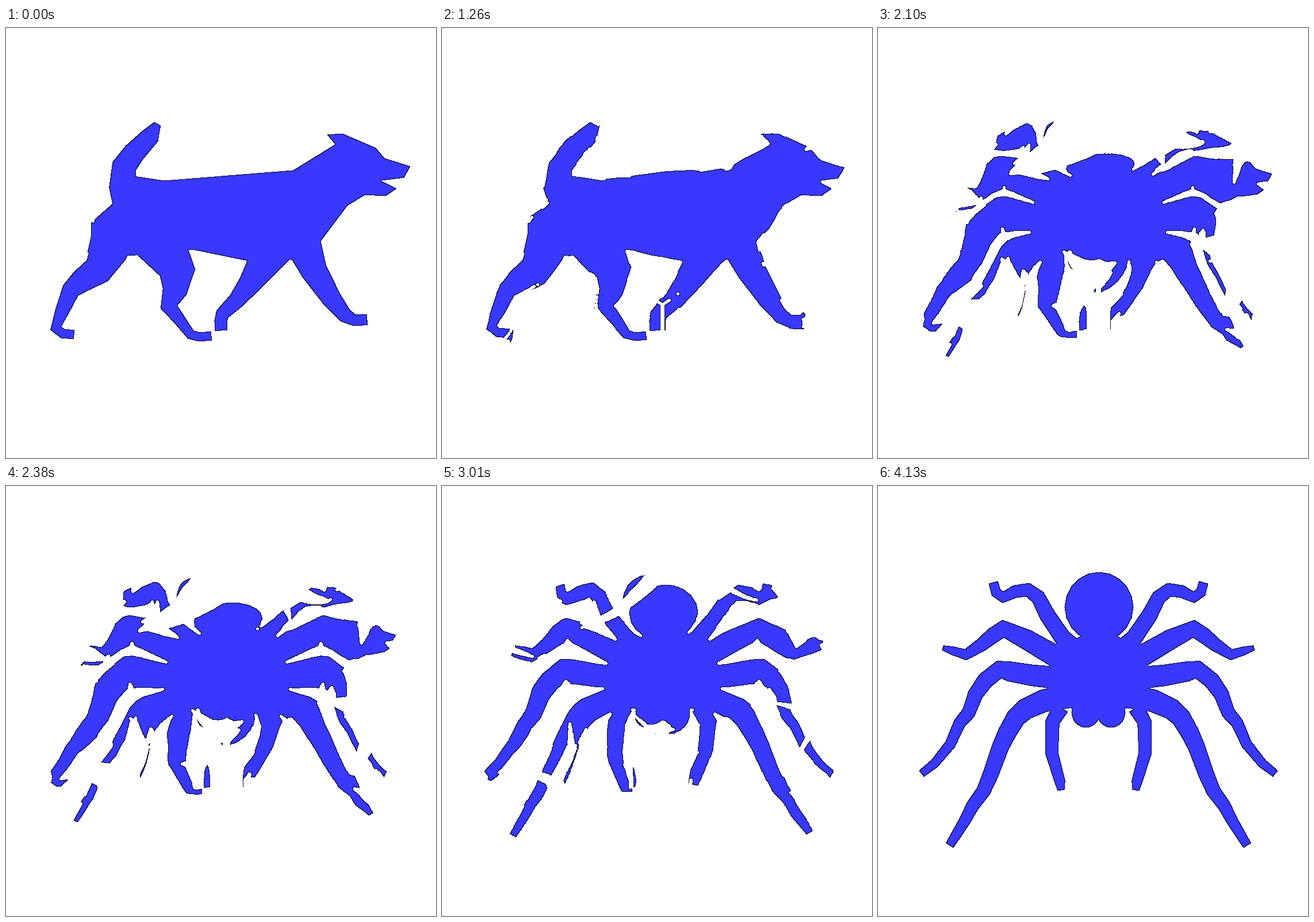
These frames come from a looping animation (748x748 px, 4.83 s). An HTML page with a canvas:

```html
<!DOCTYPE html>
<html lang="en">
<head>
<meta charset="utf-8">
<title>Dog to spider</title>
<style>
html, body { margin: 0; width: 100%; height: 100%; overflow: hidden; background: #fff; }
canvas { display: block; }
</style>
</head>
<body>
<canvas id="stage" width="748" height="748"></canvas>
<script>
// Everything happens inside this box.
const X0 = 66, Y0 = 142, W = 644, H = 492;
const WHITE = 0xffffffff, BLUE = 0xffff3838, LINE = 0xff300c0c;
const HOLD = 700, STEP = 70, STEPS = 50, LOOP = 2 * HOLD + (STEPS - 1) * STEP;
const AXIS = 383;

const ctx = document.getElementById("stage").getContext("2d");

const polygon = text => text.split(" ").map(pair => pair.split(",").map(Number));

const ellipse = (cx, cy, rx, ry) => Array.from({ length: 20 }, (_, i) => {
  const a = i * Math.PI / 10;
  return [cx + rx * Math.cos(a), cy + ry * Math.sin(a)];
});

// A limb follows its joints from tip to root, its width growing as a power of the way.
function limb(tip, root, power, text) {
  const joints = polygon(text), last = joints.length - 1, left = [], right = [];
  const unit = (a, b) => {
    const d = Math.hypot(b[0] - a[0], b[1] - a[1]) || 1;
    return [(b[0] - a[0]) / d, (b[1] - a[1]) / d];
  };
  joints.forEach((p, i) => {
    const u = unit(joints[Math.max(i - 1, 0)], p), v = unit(p, joints[Math.min(i + 1, last)]);
    const [tx, ty] = unit([0, 0], [u[0] + v[0], u[1] + v[1]]);
    const half = (tip + (root - tip) * (i / last) ** power) / 2;
    left.push([p[0] - ty * half, p[1] + tx * half]);
    right.unshift([p[0] + ty * half, p[1] - tx * half]);
  });
  return left.concat(right);
}

const mirror = part => part.map(([x, y]) => [2 * AXIS - x, y]);

const dogParts = [
  polygon("185,305 222,257 275,265 499,247 572,202 558,185 585,183 643,208 658,226 703,240 692,260 652,265 679,279 660,292 624,290 593,309 548,369 544,396 488,403 421,405 324,385 214,396 141,390 154,332"),
  limb(13, 50, 0.4, "263,166 251,187 222,217 205,240 202,275 210,305"),
  limb(19, 80, 2, "628,507 606,508 590,500 567,472 536,423 518,380 505,330"),
  limb(22, 80, 3, "374,526 373,510 376,497 400,474 422,446 446,411 470,370"),
  limb(16, 90, 3, "357,535 336,537 321,533 299,504 283,485 293,458 298,425 265,370"),
  limb(16, 80, 2, "118,533 98,531 86,522 98,490 112,456 130,440 158,422 178,390 187,345")
];

const spiderSide = [
  limb(17, 32, 1, "200,167 205,185 217,193 238,183 260,180 278,193 294,224 321,264 350,288"),
  limb(9, 42, 0.8, "112,281 129,286 152,293 179,276 200,259 217,248 257,266 310,297 350,312"),
  limb(14, 40, 1, "75,500 98,482 125,449 141,413 157,394 169,362 186,338 210,319 228,322 268,329 330,335"),
  limb(16, 42, 1, "124,625 138,602 152,579 164,556 183,530 195,502 213,452 224,429 239,403 255,388 288,373 330,365"),
  limb(12, 28, 0.6, "318,529 316,514 302,465 303,410 318,385"),
  ellipse(361, 393, 25, 27)
];
const spiderParts = [
  ...spiderSide, ...spiderSide.map(mirror),
  ellipse(384, 210, 60, 61), ellipse(384, 327, 85, 72)
];

// Rasterise the parts and find, for every pixel, the nearest point of the shape.
function makeShape(parts) {
  const mask = new OffscreenCanvas(W, H).getContext("2d"), edges = [];
  for (const part of parts) {
    const pts = part.map(([x, y]) => [x - X0 + 0.5, y - Y0 + 0.5]);
    mask.beginPath();
    pts.forEach(([x, y], i) => {
      const [x2, y2] = pts[(i + 1) % pts.length], dx = x2 - x, dy = y2 - y;
      mask.lineTo(x, y);
      edges.push([x, y, dx, dy, 1 / (dx * dx + dy * dy)]);
    });
    mask.fill();
  }
  const alpha = mask.getImageData(0, 0, W, H).data;
  const [ex, ey, dx, dy, inv] = [0, 1, 2, 3, 4].map(k => Float64Array.from(edges, e => e[k]));

  const inside = new Uint8Array(W * H);
  const nearX = new Float32Array(W * H), nearY = new Float32Array(W * H);
  for (let y = 0, p = 0; y < H; y++) {
    for (let x = 0; x < W; x++, p++) {
      const cx = x + 0.5, cy = y + 0.5;
      let bx = cx, by = cy, best = Infinity;
      inside[p] = alpha[p * 4 + 3] > 127 ? 1 : 0;
      if (!inside[p]) {
        for (let i = 0; i < ex.length; i++) {
          let u = ((cx - ex[i]) * dx[i] + (cy - ey[i]) * dy[i]) * inv[i];
          u = u < 0 ? 0 : u > 1 ? 1 : u;
          const qx = ex[i] + u * dx[i], qy = ey[i] + u * dy[i];
          const d = (cx - qx) * (cx - qx) + (cy - qy) * (cy - qy);
          if (d < best) { best = d; bx = qx; by = qy; }
        }
      }
      nearX[p] = bx; nearY[p] = by;
    }
  }
  return { inside, nearX, nearY };
}

// Is this pixel a point of `from` that has come all but `part` of its way to `to`?
function covers(from, to, p, x, y, part) {
  const nx = to.nearX[p], ny = to.nearY[p];
  const sx = Math.floor(nx + (x + 0.5 - nx) / part);
  const sy = Math.floor(ny + (y + 0.5 - ny) / part);
  if (!(sx >= 0 && sx < W && sy >= 0 && sy < H)) return false;
  const s = sy * W + sx;
  if (!from.inside[s]) return false;
  const cx = sx + 0.5, cy = sy + 0.5;
  return Math.hypot(cx - nx, cy - ny) <= Math.hypot(cx - to.nearX[s], cy - to.nearY[s]) + 0.5;
}

const disc = [];
for (let y = -2; y <= 2; y++)
  for (let x = -2; x <= 2; x++)
    if (x * x + y * y <= 5) disc.push(y * W + x);

// Spread every pixel of the given value over a small disc.
function grow(mask, value) {
  const out = mask.slice();
  mask.forEach((m, p) => {
    if (m === value) for (const d of disc) out[p + d] = value;
  });
  return out;
}

const dog = makeShape(dogParts), spider = makeShape(spiderParts);
const image = ctx.createImageData(W, H);
const pixels = new Uint32Array(image.data.buffer);
const around = [-W - 1, -W, -W + 1, -1, 1, W - 1, W, W + 1];

function draw(a) {
  let filled = new Uint8Array(W * H);
  for (let y = 0, p = 0; y < H; y++) {
    for (let x = 0; x < W; x++, p++) {
      const inDog = dog.inside[p], inSpider = spider.inside[p];
      filled[p] = inDog && inSpider ||
        !inDog && covers(spider, dog, p, x, y, a) ||
        !inSpider && covers(dog, spider, p, x, y, 1 - a) ? 1 : 0;
    }
  }
  // Close narrow cracks while the shape is on its way.
  if (a > 0 && a < 1) filled = grow(grow(filled, 1), 0);
  filled.forEach((f, p) => {
    pixels[p] = !f ? WHITE : around.every(d => filled[p + d]) ? BLUE : LINE;
  });
  ctx.putImageData(image, X0, Y0);
}

const ease = x => x < 0.5 ? 2 * x * x : 1 - 2 * (1 - x) ** 2;

let start, shown = 0;
function tick(now) {
  start ??= now;
  const t = (now - start) % LOOP;
  const step = t < HOLD ? 0 : Math.min(STEPS, Math.floor((t - HOLD) / STEP) + 1);
  if (step !== shown) draw(ease((shown = step) / STEPS));
  requestAnimationFrame(tick);
}
draw(0);
requestAnimationFrame(tick);
</script>
</body>
</html>
```
